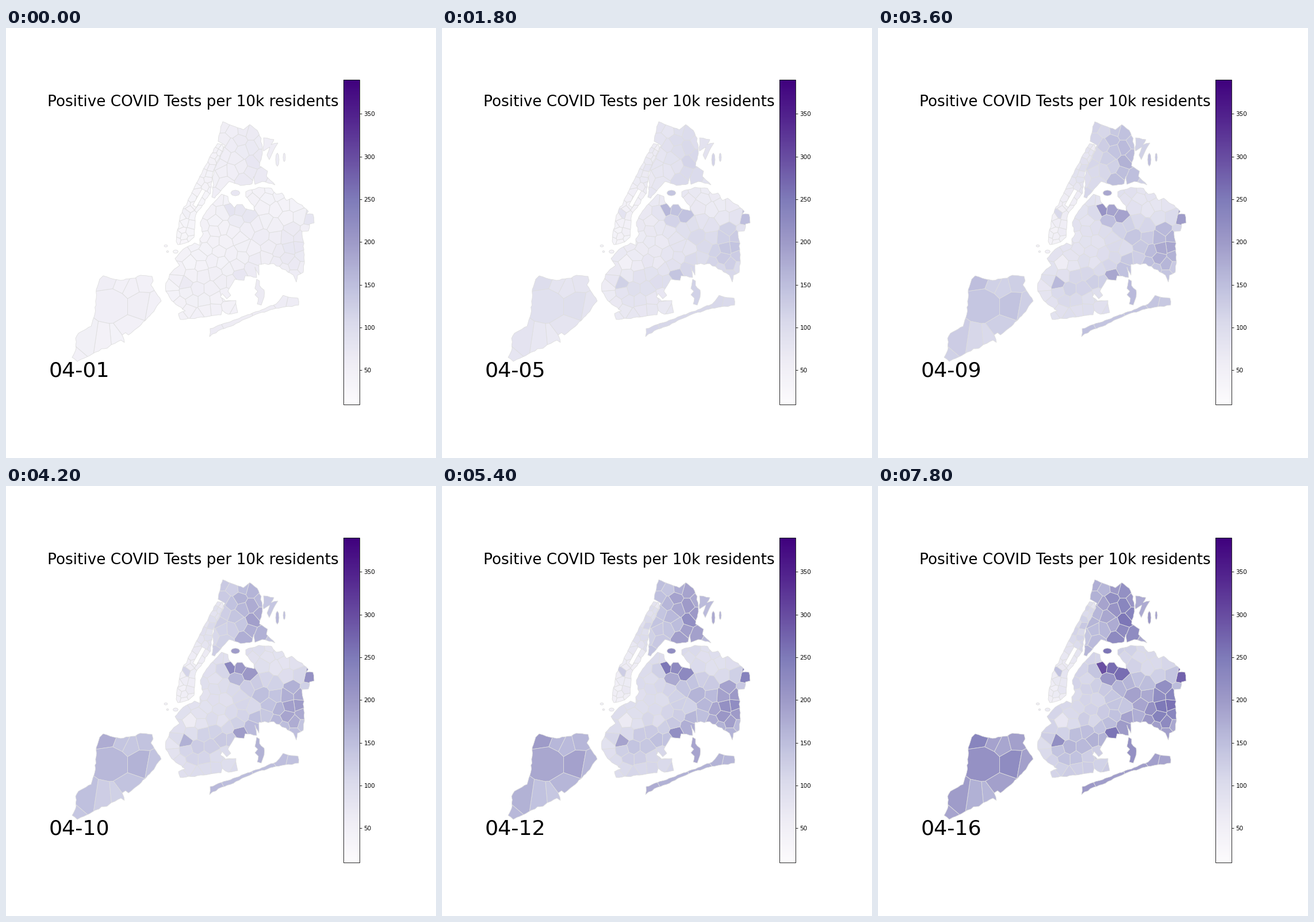
These frames come from a looping animation (748x748 px, 8000 ms). A matplotlib script:

```python
import numpy as np
import matplotlib.pyplot as plt
from matplotlib.animation import FuncAnimation
from matplotlib.cm import ScalarMappable
from matplotlib.collections import PolyCollection
from matplotlib.colors import Normalize
from matplotlib.patches import Polygon
from matplotlib.path import Path

SIZE = 748
EDGE = dict(edgecolor="0.87", linewidth=0.8)
CMAP, NORM = "Purples", Normalize(10, 390)
DAYS = [1, 3, 4, 5, *range(7, 17)]
TICKS_PER_DAY = 3

# Share of the rise from first to last day reached on the knot days
KNOTS = [1, 5, 8, 10, 12, 14, 16]
EARLY = [0, .36, .52, .68, .80, .91, 1]
LATE = [0, .23, .39, .66, .80, .91, 1]

# Key points of the coasts in pixels from the top left corner
STATEN = [
    (163, 437), (169, 431), (188, 437), (199, 439), (225, 435), (234, 430),
    (254, 432), (256, 440), (252, 447), (270, 475), (253, 497), (232, 519),
    (213, 534), (208, 530), (202, 534), (205, 541), (206, 547), (200, 543),
    (183, 551), (176, 557), (166, 558), (141, 572), (124, 580), (115, 573),
    (122, 557), (121, 540), (126, 531), (148, 519), (153, 503), (157, 470),
    (157, 455)]
BRONX = [
    (377, 163), (413, 177), (424, 168), (437, 178), (444, 192), (446, 219),
    (441, 240), (455, 249), (453, 258), (468, 273), (446, 267), (433, 272),
    (431, 258), (428, 271), (408, 274), (388, 267), (376, 280), (363, 296),
    (358, 294), (361, 273), (359, 260), (364, 241), (381, 204), (369, 197),
    (370, 188)]
PELHAM = [(448, 191), (466, 194), (461, 203), (473, 200), (468, 208),
          (458, 229), (454, 221), (459, 207), (448, 214)]
MANHATTAN = [
    (368, 201), (377, 203), (379, 212), (360, 250), (356, 287), (330, 325),
    (327, 364), (318, 372), (299, 377), (296, 371), (303, 326), (322, 290),
    (354, 225)]
PARK = [(341, 280), (347, 283), (331, 312), (325, 308)]
NORTH_SHORE = [
    (356, 309), (375, 289), (386, 293), (388, 303), (397, 313), (402, 307),
    (411, 307), (416, 314), (432, 318), (431, 309), (417, 293), (417, 285),
    (440, 277), (462, 279), (470, 289), (480, 287), (488, 300), (497, 296),
    (526, 319), (522, 324), (534, 324), (536, 339), (528, 341), (526, 353),
    (515, 354), (519, 405), (517, 425), (507, 430), (505, 442), (500, 430),
    (466, 410), (440, 411)]
SOUTH_SHORE = [
    (440, 430), (433, 416), (436, 434), (416, 431), (414, 439), (398, 437),
    (386, 458), (391, 465), (384, 471), (376, 462), (373, 468), (382, 475),
    (400, 474), (403, 495), (387, 498), (376, 491), (374, 499), (303, 507),
    (300, 497), (312, 492), (288, 474), (278, 458), (278, 444), (288, 425),
    (302, 413), (294, 401), (308, 385), (328, 374), (337, 378), (337, 367),
    (343, 358), (338, 338)]
ROCKAWAY = [
    (354, 537), (355, 523), (370, 517), (400, 507), (445, 490), (470, 480),
    (482, 465), (491, 468), (508, 470), (509, 482), (480, 486), (440, 496),
    (400, 514), (375, 524)]
BAY_ISLE = [
    (436, 437), (441, 440), (441, 448), (449, 456), (449, 468), (444, 482),
    (437, 480), (439, 470), (433, 464), (438, 458), (433, 453)]

# Local peaks and dips of the last day: x, y, height, radius
STATEN_SPOTS = [(180, 430, 48, 12), (187, 478, 18, 12), (236, 478, 28, 12),
                (194, 548, -22, 12)]
STATEN_CENTRES = [(206, 440), (218, 446), (238, 441), (258, 482), (218, 530),
                  (172, 550), (138, 545), (115, 572)]
BRONX_SPOTS = [(428, 208, 75, 15), (430, 234, 70, 13), (443, 258, 55, 16),
               (414, 263, 50, 10), (406, 195, 40, 12), (428, 182, 45, 12)]
MANHATTAN_SPOTS = [(357, 243, 45, 28), (314, 322, 75, 4), (306, 352, -18, 20)]
ISLAND_SPOTS = [
    (391, 314, 135, 7), (406, 316, 105, 9), (423, 327, 110, 10),
    (401, 336, 85, 10), (529, 333, 165, 7), (498, 350, 75, 14),
    (511, 380, 95, 18), (502, 412, 70, 22), (475, 388, 50, 28),
    (445, 362, 45, 28), (406, 430, 125, 9), (428, 418, 65, 14),
    (312, 444, 90, 8), (332, 455, 50, 18), (375, 440, 45, 20),
    (470, 315, -20, 30), (322, 410, -45, 11), (288, 450, -22, 16)]

# Small islands: x, y, width, height, value
ISLETS = [(399, 287, 16, 10, 265), (472, 229, 6, 23, 190),
          (484, 225, 4, 15, 180), (295, 389, 9, 6, 60),
          (278, 379, 6, 4, 60), (281, 389, 4, 3, 60)]

rng = np.random.default_rng(11)


def clip(poly, normal, limit):
    """Keep the part of a convex polygon where p . normal <= limit."""
    out = []
    for p, q in zip(poly, np.roll(poly, -1, axis=0)):
        a, b = p @ normal - limit, q @ normal - limit
        if a <= 0:
            out.append(p)
        if a * b < 0:
            out.append(p + (q - p) * a / (a - b))
    return np.array(out)


def voronoi(seeds):
    cells = []
    for i, s in enumerate(seeds):
        cell = np.array([(0, 0), (SIZE, 0), (SIZE, SIZE), (0, SIZE)], float)
        for j, other in enumerate(seeds):
            if i != j:
                cell = clip(cell, other - s, (other @ other - s @ s) / 2)
        cells.append(cell)
    return cells


def scatter(outline, seeds, count):
    """Add seeds inside the outline, each far from those before it."""
    pts = np.array(outline, float)
    shape = Path(pts)
    seeds = [np.array(s, float) for s in seeds]
    while len(seeds) < count:
        tries = rng.uniform(pts.min(axis=0), pts.max(axis=0), (150, 2))
        tries = tries[shape.contains_points(tries)]
        if seeds:
            gaps = tries[:, None] - np.array(seeds)
            best = np.hypot(*gaps.T).min(axis=0).argmax()
        else:
            best = 0
        seeds.append(tries[best])
    return np.array(seeds)


def rough(points, step=5, jitter=0.6):
    """Split long edges and shake the added points like a coastline."""
    pts = np.array(points, float)
    out = []
    for p, q in zip(pts, np.roll(pts, -1, axis=0)):
        n = max(1, int(np.hypot(*(q - p)) // step))
        for k in range(n):
            shake = rng.normal(0, jitter, 2) if k else 0
            out.append(p + (q - p) * k / n + shake)
    return np.array(out)


def oval(x, y, w, h):
    a = np.linspace(0, 2 * np.pi, 9)[:-1]
    return np.column_stack([x + w / 2 * np.cos(a), y + h / 2 * np.sin(a)])


class Land:
    def __init__(self, outline, base, spots=(), centres=(), count=1,
                 curve=EARLY, offset=18):
        seeds = [s[:2] for s in spots] + list(centres)
        seeds = scatter(outline, seeds, count)
        self.last = base + rng.normal(0, 7, len(seeds))
        for x, y, height, radius in spots:
            dist = np.hypot(*(seeds - (x, y)).T)
            self.last += height * np.exp(-(dist / radius) ** 2 / 2)
        self.first = offset + 0.22 * self.last
        self.curve = curve
        coast = Polygon(rough(outline), facecolor="none", zorder=3, **EDGE)
        ax.add_patch(coast)
        self.cells = PolyCollection(voronoi(seeds), cmap=CMAP, norm=NORM,
                                    **EDGE)
        ax.add_collection(self.cells)
        self.cells.set_clip_path(coast)

    def show(self, day):
        share = np.interp(day, KNOTS, self.curve)
        self.cells.set_array(self.first + (self.last - self.first) * share)


plt.rcParams["font.family"] = "DejaVu Sans"
fig = plt.figure(figsize=(10, 10), dpi=SIZE / 10, facecolor="white")
ax = fig.add_axes([0, 0, 1, 1])
ax.set(xlim=(0, SIZE), ylim=(SIZE, 0))
ax.axis("off")

lands = [
    Land(STATEN, 187, STATEN_SPOTS, STATEN_CENTRES, curve=LATE, offset=6),
    Land(BRONX, 156, BRONX_SPOTS, count=25, curve=LATE),
    Land(PELHAM, 190, curve=LATE),
    Land(MANHATTAN, 76, MANHATTAN_SPOTS, count=38),
    Land(NORTH_SHORE + SOUTH_SHORE, 115, ISLAND_SPOTS, count=95),
    Land(ROCKAWAY, 197, count=5),
    Land(BAY_ISLE, 200)]
lands += [Land(oval(*place), value) for *place, value in ISLETS]
ax.add_patch(Polygon(PARK, facecolor="white", zorder=4, **EDGE))

cax = fig.add_axes([0.7845, 0.1245, 0.038, 0.7555])
fig.colorbar(ScalarMappable(NORM, CMAP), cax=cax)
ax.text(325.2, 136.2, "Positive COVID Tests per 10k residents",
        ha="center", va="baseline", fontsize=25.25)
date = fig.text(0.1, 0.225, "", ha="left", va="top", fontsize=35)


def update(i):
    day = DAYS[i // TICKS_PER_DAY]
    date.set_text(f"04-{day:02d}")
    for land in lands:
        land.show(day)
    return []


anim = FuncAnimation(fig, update, frames=40, interval=200, repeat=True)
plt.show()
```
